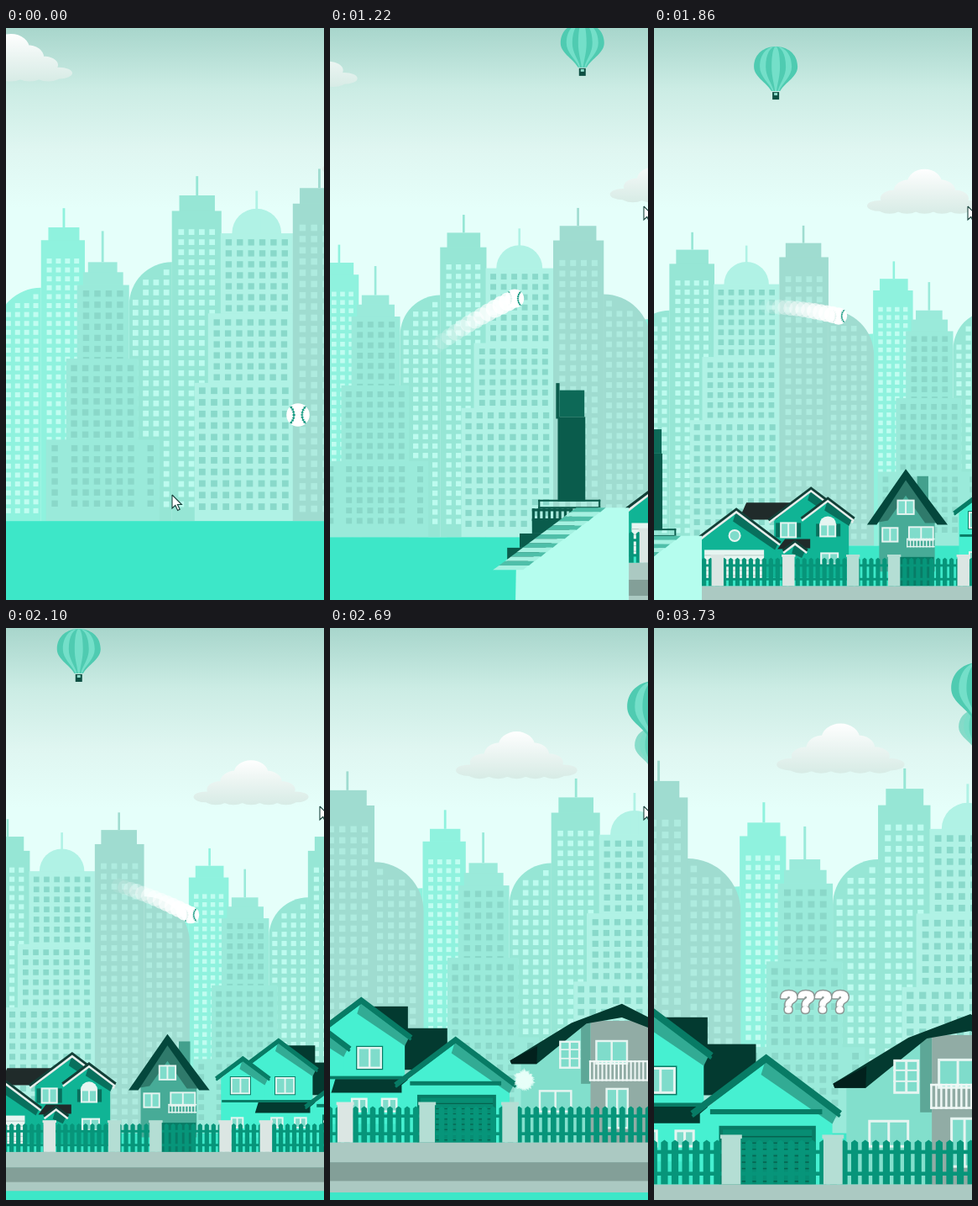
An HTML page with a canvas for the animation above (3.81 s loop, 379x680 px).

```html
<!DOCTYPE html>
<html lang="en">
<head>
<meta charset="utf-8">
<title>Home run over the city</title>
<style>
html, body { margin: 0; width: 100%; height: 100%; overflow: hidden; background: #e5fffa; }
canvas { display: block; }
</style>
</head>
<body>
<canvas id="stage" width="379" height="680"></canvas>
<script>
const ctx = document.getElementById('stage').getContext('2d');
const W = 379, H = 680, LOOP = 3810, STEP = LOOP / 47;
const HIT = 780, SCROLL = 845, LAND = 2665, FOCUS = 220;

const clamp = (v, a = 0, b = 1) => Math.max(a, Math.min(b, v));
const mix = (a, b, k) => a + (b - a) * k;
const part = (t, from, to) => clamp((t - from) / (to - from));
const smooth = k => k * k * (3 - 2 * k);
const easeOut = k => 1 - (1 - k) * (1 - k);

// The camera pulls back and tilts up during the flight, then closes in on the landing.
function cameraAt(t) {
  const dip = Math.sin(Math.PI * part(t, 1540, 2350));
  const s = 1 + 0.0875 * (1 - easeOut(part(t, 800, 1540))) - 0.012 * dip
    + 0.15 * easeOut(part(t, 2400, 3450));
  const lift = smooth(part(t, 900, 1500)) * (1 - smooth(part(t, 1800, 2480)));
  const farLift = lift ** 0.65;
  const zoom = 1 + 3.45 * (s - 1);
  const travel = clamp(t, SCROLL, LAND) - 1540;
  return {
    s, zoom, farLift, travel,
    ground: 566 + 230 * (s - 1) + 53 * farLift,
    street: 570 + 177 * (zoom - 1) + 103 * lift,
    streetX: FOCUS + (152.6 - 0.46 * travel) * zoom
  };
}

function rect(color, x, y, w, h) { ctx.fillStyle = color; ctx.fillRect(x, y, w, h); }
function trace(p) {
  ctx.beginPath();
  for (let i = 0; i < p.length; i += 2) ctx.lineTo(p[i], p[i + 1]);
}
function poly(color, ...p) { trace(p); ctx.fillStyle = color; ctx.fill(); }
function line(color, width, ...p) { trace(p); ctx.strokeStyle = color; ctx.lineWidth = width; ctx.stroke(); }
function disc(color, x, y, r) {
  ctx.beginPath(); ctx.arc(x, y, r, 0, 7); ctx.fillStyle = color; ctx.fill();
}
function at(x, y, s, draw) {
  ctx.save(); ctx.translate(x, y); ctx.scale(s, s); draw(); ctx.restore();
}
function faded(alpha, draw) { ctx.globalAlpha = alpha; draw(); ctx.globalAlpha = 1; }
function vertical(y0, y1, ...colors) {
  const g = ctx.createLinearGradient(0, y0, 0, y1);
  colors.forEach((c, i) => g.addColorStop(i / (colors.length - 1), c));
  return g;
}

// ---- Skyline: x to the right, heights above the ground ----
function column(x, top, pitch) {
  const size = pitch * 0.55;
  for (let h = top; h > size + 5; h -= pitch * 0.975) ctx.fillRect(x, -h, size, size);
}
function windows(mid, top, cols, pitch, gap = pitch) {
  const left = mid - ((cols - 1) * gap + pitch * 0.55) / 2;
  for (let i = 0; i < cols; i++) column(left + i * gap, top, pitch);
}
function tier([wall, glass], x0, x1, h, cols, pitch, drop) {
  rect(wall, x0, -h, x1 - x0, h);
  ctx.fillStyle = glass;
  windows((x0 + x1) / 2, h - drop, cols, pitch);
}
function crown([wall], mid, width, h, mast = 21) {
  rect(wall, mid - width / 2, -h, width, h);
  rect(wall, mid - 1.3, -h - mast, 2.6, mast);
}
// Quarter-round wing; its window columns stop under the curve, on the tower's rows.
function wing([wall, glass], x, h, r, side, pitch, row) {
  ctx.fillStyle = wall;
  ctx.beginPath();
  ctx.moveTo(x, 0);
  ctx.arc(x, r - h, r, -Math.PI / 2, side > 0 ? 0 : Math.PI, side < 0);
  ctx.lineTo(x + side * r, 0);
  ctx.fill();
  ctx.fillStyle = glass;
  const size = pitch * 0.55, dy = pitch * 0.975;
  for (let reach = 3 + size; reach < r; reach += pitch) {
    const limit = h - r + Math.sqrt(r * r - reach * reach) - 6;
    column(x + side * reach - (side > 0 ? size : 0), row - Math.ceil((row - limit) / dy) * dy, pitch);
  }
}
const MINT = ['#8ff2de', '#c0fdf1'], AQUA = ['#96e6d5', '#bdfbef'], PALE = ['#b0f2e5', '#89d9ca'],
  SAGE = ['#9fdcd0', '#aeebdf'], SOFT = ['#9aeada', '#8ad8c9'];
const BUILDINGS = [
  () => {
    wing(MINT, 0, 255, 50, -1, 10, 287);
    crown(MINT, 25, 34, 321);
    tier(MINT, 0, 48, 307, 4, 10, 20);
  },
  () => {
    wing(AQUA, 143.5, 283, 47, -1, 11.3, 319);
    crown(AQUA, 171, 39, 356);
    tier(AQUA, 143.4, 197.7, 339, 4, 11.3, 20);
  },
  () => {
    disc(PALE[0], 236.3, -314.5, 27);
    crown(PALE, 236.3, 8, 340);
    tier(PALE, 196.8, 276, 314.5, 6, 12.3, 6.5);
    tier(PALE, 183, 276, 227, 7, 12.3, 6.5);
    tier(PALE, 168.3, 276, 151, 8, 13, 5);
  },
  () => {
    wing(SAGE, 335, 284, 55, 1, 12.2, 324);
    crown(SAGE, 305, 43, 364);
    tier(SAGE, 275.9, 335.2, 347, 4, 12.6, 23);
  },
  () => {
    crown(SOFT, 67.5, 32, 283, 34);
    rect(SOFT[0], 46, -272, 44, 20);
    tier(SOFT, 39.5, 96.5, 258, 4, 12.4, 6);
    tier(SOFT, 27.6, 106.7, 177.5, 6, 12.4, 7);
    tier(SOFT, 5.5, 129.7, 89, 6, 12.4, 6);
    windows(67.5, 83, 2, 12.4, 105);
  }
];
function skyline(cam) {
  const x = FOCUS + (100 - 0.18 * cam.travel) * cam.s;
  for (const building of BUILDINGS)
    for (const tile of [-389, 0]) at(x + tile * cam.s, cam.ground, cam.s, building);
  rect('#3de7c8', 0, cam.ground, W, H);
}

// ---- Sky ----
function cloud(x, y, s) {
  at(x, y, s, () => {
    ctx.beginPath();
    const puff = (cx, cy, rx, ry) => { ctx.moveTo(cx + rx, cy); ctx.ellipse(cx, cy, rx, ry, 0, 0, 7); };
    for (let i = -3; i <= 3; i++) {
      const k = Math.abs(i);
      puff(i * 18, -20 + 9 * k, 21 - 2 * k, 17 - 3.5 * k);
      if (k < 3) puff(i * 21, 9, 15, 7.5);
    }
    puff(0, 1, 44, 11);
    ctx.fillStyle = vertical(-38, 18, '#ffffff', '#eaf4f1', '#d6ebe5');
    ctx.fill();
  });
}
function balloon(x, y, s) {
  at(x, y, s, () => {
    for (let i = 0; i < 4; i++) {
      const w = 26 * (1 - i * 0.27);
      ctx.beginPath();
      ctx.moveTo(-w * 0.2, 27);
      ctx.bezierCurveTo(-w * 0.45, 16, -w, 10, -w, -2);
      ctx.bezierCurveTo(-w, -34, w, -34, w, -2);
      ctx.bezierCurveTo(w, 10, w * 0.45, 16, w * 0.2, 27);
      ctx.fillStyle = i % 2 ? '#74dfc9' : '#4fcbb1';
      ctx.fill();
    }
    rect('#0d4f42', -4, 28, 8, 9);
    rect('#8edccb', -2, 29, 4, 3);
  });
}
function sky(cam) {
  const close = cam.s - 1, d = cam.travel;
  rect(vertical(0, 215, '#a8d6cc', '#cbece4', '#dff6f1', '#e5fffa'), 0, 0, W, H);
  const y = 168 - 90 * close + 36 * cam.farLift;
  cloud(-81 - 0.125 * d, y - 114 - 36 * cam.farLift, 1.06);
  cloud(363 - 0.125 * d, y, 1 + close * 0.7);
  balloon(223 - 0.24 * d, -25 - 200 * close + 72 * cam.farLift, 1);
  const x = 388 + 0.28 * (LAND - 1540 - d), y2 = 115 - 270 * close;
  faded(0.6, () => balloon(x - 2, y2 + 45, 0.88));
  balloon(x, y2, 1.3);
}

// ---- Street ----
const FRAME = '#e6f5f1', PANE = '#7fdccb';
function glass(x, y, w, h, edge = 2) {
  rect(FRAME, x, y, w, h);
  const pane = (w - edge * 3) / 2;
  for (const i of [0, 1]) rect(PANE, x + edge + i * (pane + edge), y + edge, pane, h - edge * 2);
}
function gable(x, y, half, base, [wall, shade, trim, edge]) {
  const rise = half * 0.75, in6 = half - 6;
  poly(wall, x - in6, y + rise, x, y, x + in6, y + rise, x + in6, base, x - in6, base);
  poly(shade, x, y, x + half - 2, y + rise, x + in6, y + rise + 8, x - 4, y + 13);
  line(edge, 5, x - half, y + rise, x, y, x + half, y + rise);
  line(trim, 2.5, x - half, y + rise + 2, x, y + 2, x + half, y + rise + 2);
}
function slats(color, x, y, w, h, step) {
  for (let d = step; d < h; d += step) rect(color, x, y + d, w, 1);
}
function railing(color, x, y, w, h, step, bar) {
  rect(color, x, y, w, bar); rect(color, x, y + h - bar, w, bar);
  for (let d = 0; d < w; d += step) rect(color, x + d, y, bar, h);
}
function platform() {
  const dark = '#0a5c4c';
  rect(dark, 117, 471, 4, 40);
  rect('#0d6957', 121, 479, 28, 30);
  rect(dark, 119, 509, 31, 95);
  railing(dark, 97, 602, 70, 10, 68, 2);
  railing(dark, 90, 612, 46, 14, 6, 3);
  for (let i = 0; i < 3; i++) rect(dark, 90 - i * 14, 624 + i * 16, 48, 16);
  poly('#b5fdee', 165, 611, 199, 611, 199, 790, 70, 790, 72, 681);
  for (let i = 0; i < 14; i++) {
    const x = 140 - i * 6.7, y = 611 + i * 5;
    poly(i % 2 ? '#a5f1e1' : '#4fbfa9', x, y, x + 33, y, x + 27, y + 5, x - 7, y + 5);
  }
}
function tealHouse() {
  const dark = '#08705d', style = ['#10b495', dark, '#e6efec', '#123f37'];
  poly('#202b2a', 112, 566, 176, 566, 160, 586, 103, 586);
  gable(189, 550, 50, 655, style);
  gable(209, 562, 31, 655, style);
  gable(100, 575, 52, 655, style);
  disc(FRAME, 98, 605, 7.5); disc(PANE, 98, 605, 5.5);
  rect(dark, 147, 590, 30, 17); glass(152, 589, 20, 19);
  rect(dark, 195, 591, 29, 15); disc(FRAME, 209, 592, 10); glass(199, 591, 20, 16);
  poly('#202b2a', 158, 609, 188, 609, 188, 620, 149, 621);
  gable(170, 613, 14, 655, style);
  rect(FRAME, 62, 622, 71, 34); slats('#b5cbc5', 62, 622, 71, 34, 6);
  glass(200, 625, 22, 15);
}
function grayHouse() {
  const roof = '#04473c';
  rect('#43a08d', 94, 442, 14, 32);
  poly('#47ab97', 80, 440, 116, 492, 116, 560, 47, 560, 47, 492);
  poly('#2f7a6b', 80, 440, 122, 500, 104, 500, 80, 466, 58, 497, 40, 500);
  poly(roof, 80, 433, 132, 502, 119, 502, 80, 447, 44, 502, 32, 502);
  glass(69, 471, 22, 19); glass(50, 505, 21, 19); glass(83, 504, 32, 18);
  railing(FRAME, 81, 519, 35, 11, 4, 1.5);
  rect('#087c66', 72, 542, 43, 36);
}
function mintHouse() {
  const trim = '#087b65', black = '#033a30', style = ['#46f0d1', '#32ab94', trim, trim];
  rect(black, 229, 447, 33, 24);
  rect(black, 252, 468, 48, 40);
  gable(217, 441, 48, 560, style);
  gable(173, 463, 33, 560, style);
  rect(trim, 147, 514, 110, 3);
  for (const x of [158, 213]) { rect(trim, x - 1, 485, 26, 23); glass(x, 486, 24, 21); }
  poly(black, 192, 517, 262, 517, 262, 530, 188, 530);
  for (const x of [158, 207, 236]) glass(x, 535, 16, 14);
  gable(308, 479, 58, 578, style);
  rect(trim, 264, 519, 88, 4);
  rect(trim, 271, 532, 76, 46);
  rect('#078d73', 274, 535, 70, 43); slats('#06634f', 274, 535, 70, 43, 5);
}
function paleHouse() {
  const wall = '#82dfcc';
  poly(wall, 234, 545, 325, 486, 540, 486, 540, 665, 234, 665);
  rect('#5da797', 322, 484, 14, 92);
  rect('#91aca5', 336, 484, 190, 180);
  poly('#033a30', 218, 542, 308, 487, 382, 459, 545, 542, 382, 479, 330, 488, 257, 547, 220, 547);
  poly('#02211d', 218, 542, 258, 521, 257, 547, 220, 547);
  glass(290, 513, 31, 41, 3);
  for (const y of [525, 538]) rect(FRAME, 290, y, 31, 2);
  glass(260, 585, 49, 33, 3); glass(343, 512, 48, 36, 3); glass(358, 582, 34, 60, 3);
  railing('#f0f8f6', 334, 542, 110, 30, 6, 2.5);
}
function fence() {
  const green = '#07957a';
  for (const y of [551, 568]) rect(green, -174, y, 900, 3);
  for (let x = -173; x < 720; x += 8.3) poly(green, x, 578, x, 545, x + 2.7, 543, x + 5.4, 545, x + 5.4, 578);
  [-161, -73, 7, 58, 144, 194, 273, 353].forEach((x, i) => {
    const color = i % 4 < 2 ? '#dbe6e3' : '#b4ded4';
    rect(color, x, 541, 15, 37);
    rect(color, x - 1, 539, 17, 3);
  });
}
function street(cam) {
  at(cam.streetX, cam.street, cam.zoom, () => {
    ctx.translate(0, -578);
    at(-234.4, -114.7, 1 / 0.96, tealHouse);
    grayHouse();
    mintHouse();
    at(217.1, 142.5, 1 / 1.52, paleHouse);
    fence();
    let y = 578;
    for (const [depth, color] of [[19, '#abc9c2'], [18, '#839f98'], [11, '#abc9c2'], [49, '#3de7c8'], [90, '#b5fdee']]) {
      rect(color, -174, y, 1000, depth + 0.5);
      y += depth;
    }
    at(-372, -95, 1, platform);
  });
}

// ---- Ball, swipe, stars, pointer, caption ----
function baseball(x, y, r) {
  disc('#ffffff', x, y, r);
  ctx.save();
  ctx.clip();
  ctx.strokeStyle = '#159a82';
  for (const side of [-1, 1]) {
    ctx.beginPath(); ctx.arc(x + side * r * 1.35, y, r, 0, 7);
    ctx.lineWidth = r * 0.09; ctx.stroke();
    ctx.lineWidth = r * 0.22; ctx.setLineDash([r * 0.09, r * 0.13]); ctx.stroke();
    ctx.setLineDash([]);
  }
  ctx.restore();
}
function ball(t, cam) {
  const r = 10.6 * cam.zoom;
  if (t < HIT) return baseball(mix(348, 143, t / HIT), mix(460, 428, t / HIT), r);
  if (t > LAND) return;
  const x = Math.min(FOCUS, 213 - 0.58 * (900 - t));
  const y = u => cam.street - (346 - 0.00026 * (u - 1650) ** 2) * cam.zoom;
  baseball(x, y(t), r);
  for (let age = 192; age > 0; age -= 16) {
    if (t - age < HIT - 5) continue;
    faded(0.95 * (1 - age / 208), () => disc('#ffffff', x - 0.46 * cam.zoom * age, y(t - age), r * (1 - age / 1300)));
  }
}

// The stroke is one quadratic curve; the pointer rides its tip.
function strokePoint(k) {
  const curve = (a, b, c) => mix(mix(a, b, k), mix(b, c, k), k);
  return [curve(87, 168, 330), curve(511, 489, 292)];
}
const drawn = t => part(t, 320, 660);
function swipe(t) {
  const end = drawn(t);
  if (!end || t > 1080) return;
  const upper = [], lower = [];
  for (let i = 0; i <= 24; i++) {
    const k = end * i / 24, [x, y] = strokePoint(k), [x2, y2] = strokePoint(k + 0.01);
    const half = mix(2.5, 5.5, Math.min(1, k * 2)) / Math.hypot(x2 - x, y2 - y);
    const nx = (y2 - y) * half, ny = (x - x2) * half;
    upper.push(x + nx, y + ny);
    lower.unshift(x - nx, y - ny);
  }
  faded(1 - part(t, 920, 1080), () => poly('#ffffff', ...upper, ...lower));
}
function pointer(t) {
  if (t > 700 && t < 1050 || t > 2800) return;
  const [sx, sy] = strokePoint(drawn(t)), k = part(t, 0, 320);
  const [x, y] = t > 700 ? [374, 212] : [mix(198, sx, k), mix(555, sy, k)];
  const shape = [0, 0, 0, 16, 3.8, 12.5, 6.6, 18.5, 9.2, 17.3, 6.4, 11.5, 11.4, 11.5, 0, 0];
  at(x, y, 1, () => { poly('#ffffff', ...shape); line('#16403a', 1.1, ...shape); });
}
function star(x, y, r, turn) {
  const p = [];
  for (let i = 0; i < 10; i++) {
    const a = turn + i * Math.PI / 5, d = i % 2 ? r * 0.5 : r;
    p.push(x + Math.sin(a) * d, y - Math.cos(a) * d);
  }
  poly('#e6fff9', ...p);
}
function stars(t, cam) {
  if (t < LAND || t > 3400) return;
  const age = t - LAND, grow = 1.2 * (1 - Math.exp(-age / 200));
  const cx = cam.streetX + 374 * cam.zoom, cy = cam.street - 60 * cam.zoom;
  let seed = 17;
  const random = () => (seed = seed * 16807 % 2147483647) / 2147483647;
  faded(0.62 * (1 - part(t, 3020, 3400)), () => {
    for (let i = 0; i < 34; i++) {
      const a = i * Math.PI / 17 + random() * 0.3, d = (38 + random() * 30) * grow;
      star(cx + Math.cos(a) * d, cy + Math.sin(a) * d, 8 + random() * 3, random() + age / 900);
    }
  });
}
function caption(t) {
  if (t < 3470) return;
  const k = part(t, 3470, 3670);
  faded(mix(0.3, 1, k), () => at(191.5, 444, 2 - k, () => {
    ctx.font = '900 34px Inter, "Open Sans", sans-serif';
    ctx.textAlign = 'center';
    ctx.lineJoin = 'round';
    for (const [width, color] of [[4.5, '#8d9996'], [1.5, '#ffffff']]) {
      ctx.lineWidth = width;
      ctx.strokeStyle = color;
      ctx.strokeText('????', 0, 12.5);
    }
    ctx.fillStyle = '#ffffff';
    ctx.fillText('????', 0, 12.5);
  }));
}

function render(t) {
  const cam = cameraAt(t);
  sky(cam);
  skyline(cam);
  street(cam);
  swipe(t);
  ball(t, cam);
  stars(t, cam);
  pointer(t);
  caption(t);
}

const start = performance.now();
function frame() {
  const t = (performance.now() - start) % LOOP;
  render(Math.min(46, Math.floor((t + 8) / STEP)) * STEP);
  requestAnimationFrame(frame);
}
frame();
</script>
</body>
</html>
```
